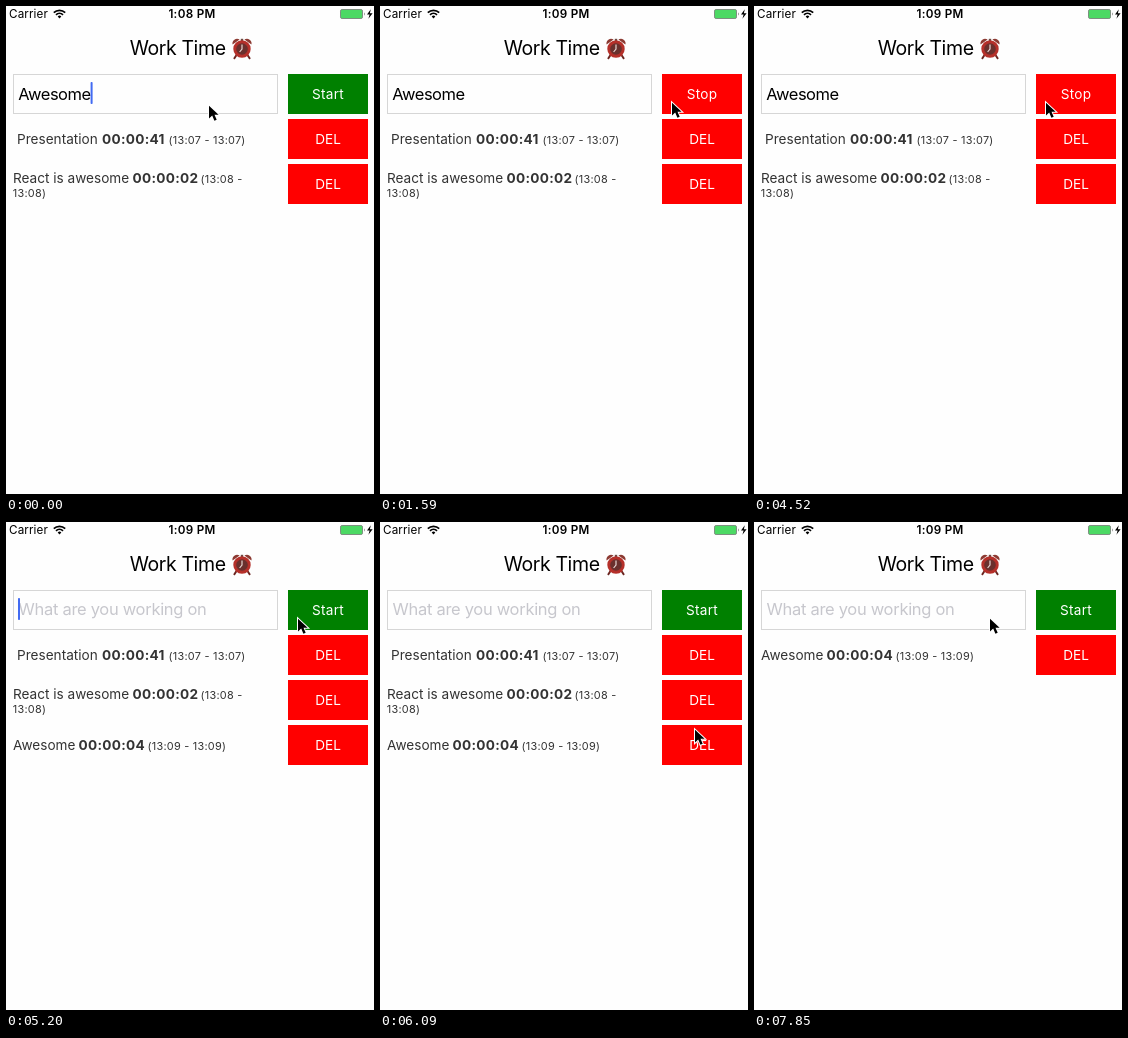
An HTML page for the animation above (8000 ms loop, 368x488 px).

```html
<!DOCTYPE html>
<html lang="en">
<head>
<meta charset="utf-8">
<title>Work Time</title>
<style>
  html, body { margin: 0; width: 100%; height: 100%; overflow: hidden; background: #fefefe; }
  svg { display: block; width: 368px; height: 488px; }
  text { font-family: Inter, Roboto, "Liberation Sans", sans-serif; font-size: 13.6px; letter-spacing: 0; fill: #333; }
  .status { font-size: 11.7px; letter-spacing: .1px; fill: #000; }
  .clock { font-weight: 600; letter-spacing: .3px; text-anchor: middle; }
  .title { font-size: 19.5px; letter-spacing: -.4px; fill: #000; }
  .field { font-size: 16.5px; letter-spacing: -.5px; fill: #000; }
  .hint { letter-spacing: -.3px; fill: #c7c7cd; }
  .total { font-weight: 700; letter-spacing: .3px; }
  .range { font-size: 10.9px; letter-spacing: .25px; }
  .label { fill: #fff; text-anchor: middle; }
  .action { letter-spacing: .3px; }
</style>
</head>
<body>
<svg viewBox="0 0 368 488" xmlns="http://www.w3.org/2000/svg">
  <rect width="368" height="488" fill="#fefefe"/>

  <text class="status" x="3" y="12.2">Carrier</text>
  <g fill="none" stroke="#000" stroke-width="1.7">
    <path d="M47.8 6.7A8 8 0 0 1 59.2 6.7M50 8.9A5 5 0 0 1 57 8.9"/>
    <path d="M51.7 10.4A2.6 2.6 0 0 1 55.3 10.4L53.5 12.4Z" fill="#000" stroke="none"/>
  </g>
  <text class="status clock" id="clock" x="186" y="12.2"></text>
  <rect x="334.5" y="3.5" width="22" height="9" rx="1.6" fill="#4cd964" stroke="#7d8f80"/>
  <path d="M358 6.3Q359.6 8 358 9.7Z" fill="#666"/>
  <path d="M364.8 3.3L361 8.6H363.6L362.4 12.8L366.6 7.2H363.9Z"/>

  <text class="title" x="123.7" y="49">Work Time</text>
  <g id="alarm">
    <path d="M230.5 49L228.4 52.2M241.5 49L243.6 52.2" stroke="#6b2520" stroke-width="2" stroke-linecap="round"/>
    <path d="M236 35V32.8" stroke="#6d4a44" stroke-width="2.4"/>
    <path d="M226.6 38.6A4.6 4.6 0 0 1 233.6 33.6ZM245.4 38.6A4.6 4.6 0 0 0 238.4 33.6Z" fill="#8c3a32"/>
    <circle cx="236" cy="43" r="8.7" fill="#b5302a"/>
    <circle cx="236" cy="43" r="5.8" fill="#6a302d"/>
    <path d="M236 38.6V43L233.6 46" fill="none" stroke="#e4d4d0" stroke-width="1.2"/>
  </g>

  <rect x="7.5" y="68.5" width="264" height="39" fill="#fefefe" stroke="#d6d6d6"/>
  <text class="field" id="task" x="12.3" y="94">Awesome</text>
  <text class="field hint" id="hint" x="12.6" y="93">What are you working on</text>
  <rect id="caret" y="76" width="2" height="22" rx=".8" fill="#426bf2"/>

  <rect id="button" x="282" y="68" width="80" height="40"/>
  <text class="label action" id="action" x="322" y="93"></text>

  <g id="rows"></g>

  <path id="pointer" d="M1 1.8V14.6L4.2 11.6L6.4 16.8L8.7 15.8L6.5 10.8H10.6Z" fill="#000"
    stroke="#fff" stroke-width="2" paint-order="stroke"/>
</svg>
<script>
const LOOP = 8000, START = 850, STOP = 5200, MINUTE = 600;
const $ = id => document.getElementById(id);

function add(parent, tag, attrs, text = '') {
  const el = document.createElementNS('http://www.w3.org/2000/svg', tag);
  for (const key in attrs) el.setAttribute(key, attrs[key]);
  el.textContent = text;
  parent.appendChild(el);
  return el;
}

// Each part of a row: text, x, baseline, class
const rows = [
  { from: 0, to: 7490, parts: [
    ['Presentation', 11, 25, ''], ['00:00:41', 96, 25, 'total'], ['(13:07 - 13:07)', 162.5, 25, 'range']] },
  { from: 0, to: 6700, parts: [
    ['React is awesome', 7, 18.5, ''], ['00:00:02', 126.5, 18.5, 'total'],
    ['(13:08 -', 194.5, 18.5, 'range'], ['13:08)', 6.8, 32.5, 'range']] },
  { from: STOP, to: LOOP, parts: [
    ['Awesome', 7, 25, ''], ['00:00:04', 72.5, 25, 'total'], ['(13:09 - 13:09)', 141.5, 25, 'range']] }
];

for (const row of rows) {
  row.el = add($('rows'), 'g', {});
  for (const [text, x, y, cls] of row.parts) add(row.el, 'text', { x, y, class: cls }, text);
  add(row.el, 'rect', { x: 282, y: 0, width: 80, height: 40, fill: '#f00' });
  add(row.el, 'text', { x: 322, y: 25, class: 'label' }, 'DEL');
}

// Pointer stops: time, x, y
const path = [
  [0, 202, 98], [290, 202, 98], [700, 291, 95], [5690, 291, 95], [6070, 314, 206],
  [6110, 314, 206], [6320, 320, 180], [6800, 320, 180], [7140, 320, 137],
  [7310, 320, 133], [7670, 320, 133], [7850, 235, 95], [LOOP, 235, 95]
];

function pointerAt(t) {
  const i = path.findIndex(stop => stop[0] > t);
  const [t0, x0, y0] = path[i - 1], [t1, x1, y1] = path[i];
  const p = (t - t0) / (t1 - t0), e = p * p * (3 - 2 * p);
  return [x0 + (x1 - x0) * e, y0 + (y1 - y0) * e];
}

// The blink restarts when the field is cleared
function caretAlpha(t) {
  const first = t < STOP ? 405 : 5715;
  if (t < first) return 1;
  const p = (t - first) % 985;
  if (p < 160) return 1 - p / 160;
  return p < 495 ? 0 : Math.min(1, (p - 495) / 85);
}

const show = (el, on) => el.setAttribute('visibility', on ? 'visible' : 'hidden');

function draw(t) {
  const running = t >= START && t < STOP, cleared = t >= STOP;
  $('clock').textContent = t < MINUTE ? '1:08 PM' : '1:09 PM';
  $('action').textContent = running ? 'Stop' : 'Start';
  $('button').setAttribute('fill', running ? '#f00' : '#008000');
  show($('task'), !cleared);
  show($('hint'), cleared);
  $('caret').setAttribute('x', cleared ? 12 : 84.6);
  $('caret').setAttribute('opacity', caretAlpha(t));

  let index = 0;
  for (const row of rows) {
    const on = t >= row.from && t < row.to;
    show(row.el, on);
    if (on) row.el.setAttribute('transform', `translate(0 ${113 + 45 * index++})`);
  }
  $('pointer').setAttribute('transform', `translate(${pointerAt(t).map(Math.round)})`);
}

const begin = performance.now();
function tick() {
  draw((performance.now() - begin) % LOOP);
  requestAnimationFrame(tick);
}
tick();
</script>
</body>
</html>
```
